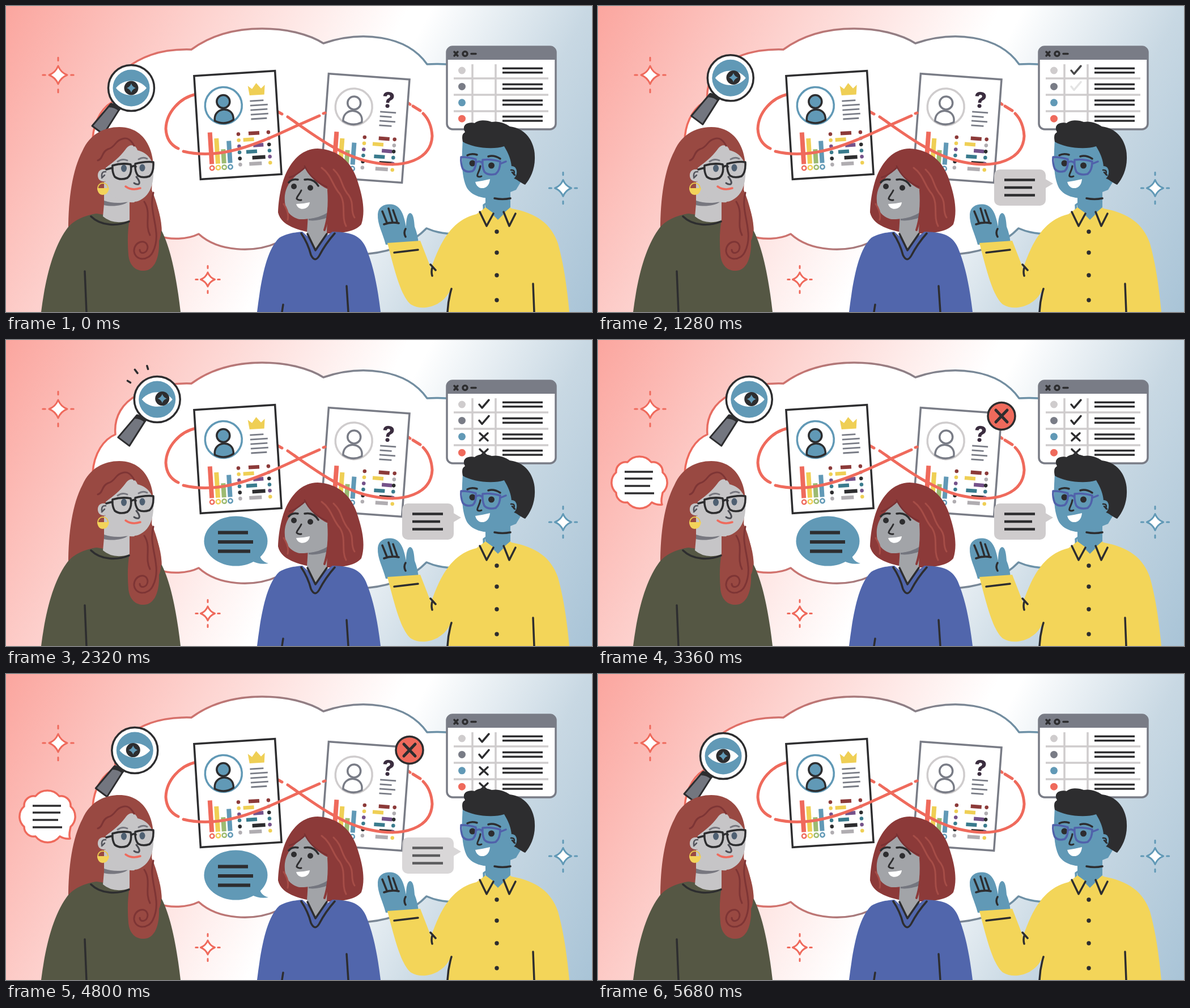
Write an HTML page that moves like this. It is 1034x541 px and loops after 5760 ms.

```html
<!DOCTYPE html>
<html lang="en">
<head>
<meta charset="utf-8">
<title>Three people comparing profiles</title>
<style>
html, body { margin: 0; width: 100%; height: 100%; overflow: hidden; }
svg { display: block; width: 100%; height: 100%; }
.ln { fill: none; stroke: #2d2d2f; stroke-width: 3.5; stroke-linecap: round; stroke-linejoin: round; }
.flat { stroke-linecap: butt; }
.red { stroke: #ef6a5c; }
.ink { fill: #2d2d2f; }
.blue { fill: #6199b6; }
.white { fill: #fff; }
.loop path { stroke-width: 5; }
text { font-family: Inter, "Open Sans", sans-serif; font-weight: 800; }
</style>
</head>
<body>
<svg viewBox="0 0 1034 541" preserveAspectRatio="none">
<defs>
  <linearGradient id="sky" gradientUnits="userSpaceOnUse" x1="0" y1="0" x2="1027" y2="550">
    <stop offset="0" stop-color="#fba69f"/><stop offset=".54" stop-color="#fff"/>
    <stop offset=".57" stop-color="#fff"/><stop offset=".78" stop-color="#c8d8e3"/>
    <stop offset="1" stop-color="#a9c4d7"/>
  </linearGradient>
  <linearGradient id="edge" gradientUnits="userSpaceOnUse" x1="150" y1="0" x2="850" y2="0">
    <stop offset="0" stop-color="#ef6a5c"/><stop offset=".2" stop-color="#d8716b"/>
    <stop offset=".6" stop-color="#858088"/><stop offset="1" stop-color="#6199b6"/>
  </linearGradient>
</defs>
<rect width="1034" height="541" fill="url(#sky)"/>
<g id="sparkles"></g>

<path d="M153 235C155 200 173 175 193 167C190 135 206 111 232 97C262 80 295 76 327 77C365 49 410 40 452 40C495 40 535 50 560 66C625 44 706 50 743 103C840 98 905 140 900 215C899 275 880 330 843 352C848 400 790 414 742 393C715 421 680 434 640 438C580 448 520 435 480 418C438 437 375 435 340 403C320 413 290 414 268 406L180 350Z"
  class="white" stroke="url(#edge)" stroke-width="3.5" stroke-linejoin="round"/>

<g class="loop">
  <path d="M335 156C307 162 283 188 282 217C283 236 291 246 304 252M478 186L487 191M709 171L713 174" class="ln red"/>
</g>
<g id="docs"></g>
<g class="loop">
  <path d="M313 257C382 274 451 240 510 213L553 194M560 190L563 189M497 196C535 222 590 266 645 276C702 288 750 272 752 230C751 212 746 200 736 190M731 185L718 177" class="ln red"/>
</g>

<g id="window">
  <rect x="778" y="72" width="192" height="146" rx="10" class="white"/>
  <path d="M778 95V82Q778 72 788 72H960Q970 72 970 82V95Z" fill="#797c86"/>
  <g id="grid"></g>
  <path d="M791 81l6 7m0-7l-6 7M821 84.5h8" class="ln"/>
  <circle cx="810" cy="84.5" r="4" class="ln"/>
  <g id="marks" class="ln"></g>
  <rect x="778" y="72" width="192" height="146" rx="10" fill="none" stroke="#797c86" stroke-width="3.5"/>
</g>

<g id="badge">
  <circle cx="712" cy="134.5" r="24" class="ln" style="fill:#ef6a5c"/>
  <path d="M702 124l20 21m0-21l-20 21" class="ln" style="stroke-width:5"/>
</g>
<g id="cloudTalk">
  <path d="M52 216A27 27 0 0 1 94 216A17 17 0 0 1 114 234A24 24 0 0 1 114 270C113 277 110 284 113 291Q103 292 95 287A27 27 0 0 1 52 287A17 17 0 0 1 32 270A24 24 0 0 1 32 234A17 17 0 0 1 52 216Z" class="ln red" style="fill:#fff"/>
  <path d="M47 233H97M47 245H96M47 258H92M47 271H99" class="ln flat"/>
</g>
<g id="ovalTalk">
  <path d="M447 375C447 386 453 392 463 395C452 397 441 395 433 390Z" class="blue"/>
  <ellipse cx="405.5" cy="355.5" rx="56" ry="44" class="blue"/>
  <path d="M374 340.5H427M374 357H436M374 373.5H431" class="ln flat" style="stroke-width:6"/>
</g>
<g id="greyTalk" fill="#cfcccd">
  <rect x="699" y="289" width="91" height="64" rx="10"/>
  <path d="M788 305L803 314L788 323Z"/>
  <path d="M717 307.5H771M717 321H766M717 334.5H771" class="ln flat" style="stroke-width:4.5"/>
</g>

<g id="lens">
  <path d="M-36 28L-69 67L-49 82L-18 33Z" class="ln" style="fill:#73767f;stroke-width:3"/>
  <path d="M-35 26L-17 36L-22 41Q-29 34-40 34Z" class="ink"/>
  <circle r="40.5" class="ln" style="fill:#fff"/>
  <circle r="32.5" class="blue"/>
  <path d="M-27 0C-14-17 14-17 27 0C14 17-14 17-27 0Z" class="white"/>
  <g id="pupil">
    <circle r="12.5" class="ink"/>
    <path d="M0-8Q2-2 8 0Q2 2 0 8Q-2 2-8 0Q-2-2 0-8Z" class="blue"/>
  </g>
</g>
<g id="rays" class="ln"></g>

<g id="leftWoman">
  <path d="M110 396C110 340 117 290 135 256C148 227 172 214 200 214C234 214 254 238 259 272L257 330C268 355 275 375 275 402L240 440L150 390Z" fill="#994942"/>
  <path d="M62 541C69 485 82 430 106 396C118 378 140 370 160 367L218 376L275 398C291 430 301 480 308 541Z" fill="#555744"/>
  <path d="M173 310V350L171 372Q190 388 218 379V335Z" fill="#c6c5c7"/>
  <path d="M173 344C186 349 202 349 216 346C205 354 186 355 173 352Z" fill="#77777f"/>
  <path d="M176 286C192 274 202 266 212 252C218 244 228 244 232 255C244 258 257 266 260 285C262 315 254 340 227 347C202 349 180 336 175 312Z" fill="#c6c5c7"/>
  <path d="M178 290C168 286 161 292 162 301C163 309 170 312 178 309Z" fill="#c6c5c7"/>
  <path d="M227 346C216 370 213 405 216 440C218 460 230 469 244 468C262 467 271 446 270 415C278 400 272 360 257 325C251 339 243 345 227 346Z" fill="#994942"/>
  <path d="M162 273C172 270 168 258 180 253C194 249 192 238 205 235C214 232 220 236 226 247M260 330C250 365 277 400 259 435C252 450 229 452 226 434C225 416 248 410 250 426C250 438 236 440 236 431M244 346C257 366 244 385 254 405" class="ln" style="stroke:#7e3535;stroke-width:3"/>
  <path d="M150 372C168 390 198 389 217 381M139 469L142 541" class="ln"/>
  <path d="M176 293Q168 292 169 302M174 299L169 304" class="ln" style="stroke:#55565e;stroke-width:2.5"/>
  <circle cx="171" cy="322" r="9" class="ln" style="stroke:#e9c84e;stroke-width:2"/>
  <path d="M161 322H182Q180 334 171 334Q162 334 161 322Z" fill="#f3d35a"/>
  <path d="M197 275Q205 269 214 273M234 271Q242 266 249 270" class="ln" style="stroke:#77777f;stroke-width:3"/>
  <g id="eyesA" fill="#4f6072"><ellipse cx="208" cy="287" rx="5" ry="6.5"/><ellipse cx="240.5" cy="286" rx="5" ry="6.5"/></g>
  <path d="M188 282Q204 277 220 280Q223 297 214 304Q201 309 192 302Q187 294 188 282ZM228 279Q245 274 260 276Q261 295 253 301Q241 305 233 300Q227 293 228 279ZM221 285Q224 281 229 284M188 286L177 289" class="ln"/>
  <path d="M230 302Q238 312 234 315Q230 316 226 313" class="ln" style="stroke:#4b4c53;stroke-width:3"/>
  <path d="M211 319Q222 327 237 322" class="ln red"/>
</g>

<g id="midWoman">
  <path d="M480 365C481 335 488 305 498 288C511 264 530 252 550 252C590 254 613 280 622 315C630 340 634 365 627 386C615 400 590 402 565 402L530 399C505 393 484 384 480 365Z" fill="#8c3a39"/>
  <path d="M443 541C450 485 459 432 482 410C495 402 512 400 523 399L546 420L576 399C603 400 624 402 635 427C649 460 656 500 661 541Z" fill="#5166ac"/>
  <path d="M533 370L568 350L566 401L546 432L531 400Z" fill="#a2a4a8"/>
  <path d="M534 376Q552 375 568 365V374Q548 381 534 379Z" fill="#74767f"/>
  <path d="M528 287C510 300 495 312 492 335C490 360 500 373 518 377C545 378 566 367 569 352L568 324C551 316 535 301 528 287Z" fill="#a2a4a8"/>
  <path d="M569 325Q572 365 562 396" class="ln" style="stroke:#8c3a39;stroke-width:4"/>
  <path d="M527 283Q538 307 566 320M528 285Q512 300 500 303" class="ln" style="stroke:#793133;stroke-width:2.5"/>
  <path d="M557 286C575 299 576 318 589 332C601 351 591 372 600 389M578 289C595 305 590 318 605 335C615 350 607 362 615 374M490 350Q500 365 497 378" class="ln" style="stroke:#a64d47;stroke-width:3"/>
  <path d="M521 402Q533 420 538 440Q545 455 553 441Q564 420 580 402M532 403L546 432L566 403M601 495L604 541M489 528L487 541" class="ln"/>
  <path id="browsB" d="M499 312Q505 305 515 307M527 307Q543 304 551 318" class="ln"/>
  <g id="eyesB" class="ink"><circle cx="508" cy="319" r="5"/><circle cx="537" cy="321.5" r="5"/></g>
  <path d="M521 326C518 333 512 338 513 341Q516 344 521 343" class="ln" style="stroke-width:3"/>
  <path d="M512 350Q524 350 536 347C535 360 516 364 512 350Z" class="white"/>
</g>

<g id="man">
  <path d="M670 422C665 402 655 386 656 368C657 352 673 348 686 352C700 358 703 376 706 390C706 377 708 367 713 366C719 367 720 378 721 390C725 400 727 410 728 420Z" class="blue"/>
  <path d="M673 419L731 415L750 464C765 420 786 378 830 368L845 358H892C936 366 962 385 974 420C985 460 990 500 994 541H779L783 504C770 531 735 540 715 528C697 515 685 465 673 419Z" fill="#f3d559"/>
  <path d="M846 315H890V356L868 378L846 356Z" class="blue"/>
  <path d="M846 356L836 364L848 389L861 367ZM890 356L899 366L888 389L877 367Z" fill="#f3d559"/>
  <path d="M836 364L848 389L860 367M878 364L888 389L899 367" class="ln"/>
  <path d="M806 236C804 268 803 298 812 319C820 337 848 344 870 337L900 325L912 305L902 250L860 220Z" class="blue"/>
  <path d="M806 240C804 230 805 226 810 223C803 211 814 204 827 207C835 200 850 202 857 205C870 203 880 207 889 213C917 216 933 240 933 266C934 288 925 306 916 316C907 312 901 306 896 305C903 295 901 283 892 284C891 270 885 258 879 248C858 255 822 250 806 240Z" class="ink"/>
  <path d="M892 283C903 283 904 299 896 305L888 303Z" class="blue"/>
  <path d="M891 290Q899 289 896 298M893 294L898 299" class="ln" style="stroke-width:2.5"/>
  <path d="M862 340Q876 343 890 340" class="ln"/>
  <path id="browsC" d="M814 264Q821 260 831 263M851 266Q861 263 872 270" class="ln"/>
  <g id="eyesC" class="ink"><circle cx="823" cy="278" r="5.5"/><circle cx="856.5" cy="282" r="5.5"/></g>
  <path d="M803 267Q817 267 829 271Q830 287 823 292Q812 295 806 288Q802 279 803 267ZM841 272Q856 270 872 275Q872 291 864 297Q850 300 844 293Q840 284 841 272ZM829 277Q835 272 841 278M872 279L882 275" class="ln" style="stroke:#5061aa"/>
  <path d="M837 283C836 292 830 298 832 301Q835 303 839 301" class="ln" style="stroke-width:3"/>
  <path d="M828 311Q842 309 854 306C853 318 846 323 838 322Q830 320 828 311Z" class="white"/>
  <path d="M664 363L672 383M675 358L682 382M683 361L690 381M667 386Q680 381 693 384M705 394Q701 401 705 408M685 436L727 431M749 457L758 467M752 463Q750 470 752 477M786 500Q780 520 779 541M930 491L932 541" class="ln"/>
  <g id="buttons" class="ink"></g>
</g>
</svg>
<script>
const LOOP = 5760;
const $ = id => document.getElementById(id);
const clamp = v => Math.max(0, Math.min(1, v));
const ramp = (t, a, b) => clamp((t - a) / (b - a));
const sine = p => (1 - Math.cos(Math.PI * p)) / 2;
const dot = (x, y, r, fill, extra = '') => `<circle cx="${x}" cy="${y}" r="${r}" fill="${fill}" ${extra}/>`;
const line = (x1, y1, x2, y2, color, w) =>
  `<path d="M${x1} ${y1}L${x2} ${y2}" fill="none" stroke="${color}" stroke-width="${w}"/>`;

const RED = '#ef6a5c', BLUE = '#6199b6', GREY = '#797c86', PALE = '#cfcccd', INK = '#2d2d2f';
const YELLOW = '#efcf55', GREEN = '#9dbb72';

function sparkle(x, y, r, color) {
  const q = r * .28;
  const star = `M0 ${-r}Q${q} ${-q} ${r} 0Q${q} ${q} 0 ${r}Q${-q} ${q} ${-r} 0Q${-q} ${-q} 0 ${-r}Z`;
  const a = r * 1.6, b = r * 1.92, c = r * 1.42, d = r * 1.7;
  return `<g transform="translate(${x} ${y})" fill="#fff" stroke="${color}" stroke-width="3" stroke-linecap="round" stroke-linejoin="round">
    <path d="${star}M0 ${-a}V${-b}M0 ${a}V${b}M${-c} 0H${-d}M${c} 0H${d}"/></g>`;
}
$('sparkles').innerHTML = sparkle(92, 122, 16, RED) + sparkle(356, 483.5, 12.5, RED) + sparkle(983, 322, 14.5, BLUE);

// One profile sheet, drawn around its own centre
function sheet(x, y, angle, border, known) {
  const ring = known ? BLUE : PALE, body = known ? BLUE : '#fff', pen = known ? INK : GREY;
  let s = `<rect x="-71.5" y="-91.5" width="143" height="183" fill="#fff" stroke="${border}" stroke-width="3.5"/>`;
  s += dot(-23, -36, 32.5, '#fff', `stroke="${ring}" stroke-width="3.5"`);
  s += `<g fill="${body}" stroke="${pen}" stroke-width="3.5" stroke-linejoin="round">
    <path d="M-40-10V-14C-38-34-8-34-7-14V-10Q-23 0-40-10Z"/><circle cx="-23" cy="-43" r="11.5"/></g>`;
  s += known
    ? `<path d="M22-68L29-62L37-72L45-62L52-68L50-51H24Z" fill="${YELLOW}"/>`
    : `<text x="37" y="-39" font-size="38" text-anchor="middle" fill="#3b2d3f">?</text>`;
  const ends = known ? [48, 55, 54, 55, 52] : [52, 45, 52, 46];
  const top = known ? -41 : -31;
  ends.forEach((e, i) => s += line(24, top + i * 8, e, top + i * 8, GREY, 2.8));
  [[RED, 10], [YELLOW, 21], [GREEN, 41], [BLUE, 27]].forEach(([c, tip], i) => {
    const bx = -50 + i * 10.8;
    s += line(bx, tip, bx, 66, c, 8) + dot(bx, 73, 3.7, '#fff', `stroke="${c}" stroke-width="2.5"`);
  });
  const rows = [['#8c3a39', 18, 37], [YELLOW, 8, 27], ['#75528a', 25, 43], ['#397b8d', 12, 31], [INK, 22, 45], ['#b0adb1', 16, 38]];
  rows.forEach(([c, a, b], i) => {
    const ry = 16 + i * 10.8, shift = known ? 0 : 7;
    s += line(a + shift, ry, b + shift, ry, c, 6.5) + dot(0, ry, 3.3, c);
    s += dot(53, ry, 3.3, rows[(i * 5) % 6][0]);
  });
  return `<g transform="translate(${x} ${y}) rotate(${angle})">${s}</g>`;
}
$('docs').innerHTML = sheet(634, 216, 4.2, GREY, false) + sheet(409, 210.5, -3.6, INK, true);

let grid = '';
[128, 157, 186].forEach(y => grid += line(790, y, 957, y, PALE, 3.5));
[823, 864].forEach(x => grid += line(x, 103, x, 212, PALE, 3.5));
[PALE, GREY, BLUE, RED].forEach((c, i) => {
  const y = 114 + i * 28.4;
  grid += dot(804.5, y, 6.5, c) + line(876, y - 3.8, 947, y - 3.8, INK, 3.5) + line(876, y + 3.8, 947, y + 3.8, INK, 3.5);
});
$('grid').innerHTML = grid;
const tick = 'l5 6l12 -14', cross = 'm1 -6l14 13m0 -13l-14 13';
$('marks').innerHTML = [tick, tick, cross, cross]
  .map((d, i) => `<path d="M835 ${114 + i * 28.4}${d}"/>`).join('');
$('buttons').innerHTML = [399, 436, 476, 520].map(y => dot(866, y, 3.7, INK)).join('');
$('rays').innerHTML = '<path/><path/><path/>';

// Piecewise linear value from [time, value] stops
function track(stops, t) {
  for (let i = 1; i < stops.length; i++) {
    const [a, u] = stops[i - 1], [b, v] = stops[i];
    if (t <= b) return u + (v - u) * ramp(t, a, b);
  }
  return stops[stops.length - 1][1];
}
const gaze = [[240, 0], [720, 4], [1680, 6], [2320, 9], [2800, 9], [3360, 4], [4800, -3], [5600, 0]];

function blink(id, cy, times, t, brows) {
  const shut = Math.max(...times.map(c => clamp(1 - Math.abs(t - c) / 160)));
  const k = 1 - .88 * shut;
  $('eyes' + id).setAttribute('transform', `translate(0 ${cy * (1 - k)}) scale(1 ${k})`);
  if (brows) $('brows' + id).setAttribute('transform', `translate(0 ${shut * 1.5})`);
}
const fade = (el, t, a, b) => el.setAttribute('opacity', ramp(t, a, a + 320) * (1 - ramp(t, b, b + 320)));

function draw(t) {
  const s = sine(ramp(t, 480, 2400)) * (1 - sine(ramp(t, 3280, 5440)));
  const mid = 2 * s * (1 - s);
  const x = 221 + 46 * (mid * .3 + s * s), y = 145 - 40 * (mid * .65 + s * s);
  const look = track(gaze, t);
  $('lens').setAttribute('transform', `translate(${x} ${y})`);
  $('pupil').setAttribute('transform', `translate(${look} ${-Math.abs(look) / 6})`);

  const out = 53 + 9 * ramp(t, 2160, 2640);
  [-148, -127, -107].forEach((deg, i) => {
    const c = Math.cos(deg * Math.PI / 180), d = Math.sin(deg * Math.PI / 180);
    const near = out + (i === 1 ? 2 : 0), far = near + (i === 1 ? 8 : 6);
    $('rays').children[i].setAttribute('d', `M${267 + c * near} ${105 + d * near}L${267 + c * far} ${105 + d * far}`);
  });
  $('rays').setAttribute('opacity', ramp(t, 2120, 2280) * (1 - ramp(t, 2800, 3040)));

  fade($('greyTalk'), t, 460, 4730);
  fade($('ovalTalk'), t, 1420, 4960);
  fade($('cloudTalk'), t, 2960, 5200);
  fade($('badge'), t, 2800, 5000);
  [...$('marks').children].forEach((m, i) => fade(m, t, 1000 + i * 240, 5120));

  blink('A', 286.5, [3840], t);
  blink('B', 320, [800, 3000], t, true);
  blink('C', 280, [480, 1480, 2560, 4360], t, true);
}

const start = performance.now();
function frame(now) {
  draw(Math.max(0, now - start) % LOOP);
  requestAnimationFrame(frame);
}
draw(0);
requestAnimationFrame(frame);
</script>
</body>
</html>
```
